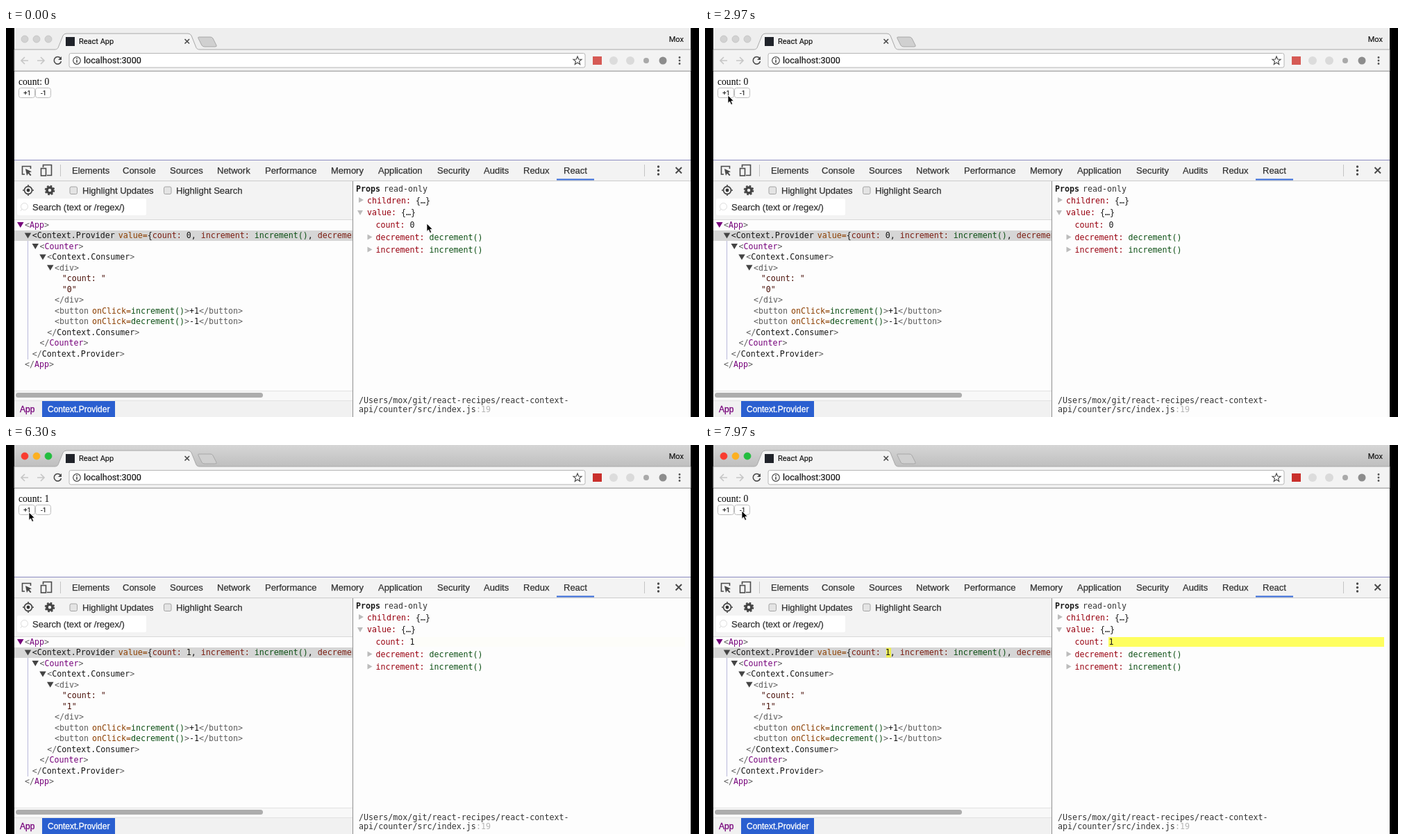
Write an HTML page that moves like this. It is 998 by 561 pixels and loops after 8 s.

```html
<!DOCTYPE html>
<html lang="en">
<head>
<meta charset="utf-8">
<title>Counter</title>
<style>
  html, body { margin: 0; width: 100%; height: 100%; overflow: hidden; background: #000; }
  svg { display: block; width: 100%; height: 100%; }
  text { white-space: pre; }
  .ui { font: 11px Roboto, sans-serif; fill: #111; stroke: #111; stroke-width: .15; }
  .tool { font: 13px "Liberation Sans", Arial, sans-serif; fill: #333; stroke: #333; stroke-width: .25; }
  .crumb { font: 12px "Liberation Sans", Arial, sans-serif; stroke-width: .3; }
  .page { font: 13.6px "Liberation Serif", Times, serif; fill: #000; }
  .code { font: 11.64px "DejaVu Sans Mono", monospace; fill: #1a1a1a; }
  .path { font-size: 11.7px; fill: #333; }
  .tag { fill: #75007a; }
  .host { fill: #5c5c5c; }
  .special { fill: #161616; }
  .attr { fill: #8c3f00; }
  .key { fill: #98000f; }
  .text { fill: #4a1008; }
  .func { fill: #0c4f14; }
  .faint { fill: #b5b5b5; }
  #tree .key { fill: #7a1c10; }
  .line { fill: none; stroke: #4a4a4a; stroke-width: 1.6; }
</style>
</head>
<body>
<svg viewBox="0 0 998 561" preserveAspectRatio="none">
  <defs>
    <linearGradient id="active" x2="0" y2="1"><stop stop-color="#d6d6d6"/><stop offset="1" stop-color="#bfbfbf"/></linearGradient>
  </defs>
  <rect width="998" height="561"/>
  <rect x="12" width="974" height="561" fill="#fdfdfd"/>

  <!-- Tab strip -->
  <rect id="strip" x="12" width="974" height="31"/>
  <g id="lights" stroke-width=".7">
    <circle cx="27" cy="16" r="5"/><circle cx="44" cy="16" r="5"/><circle cx="61" cy="16" r="5"/>
  </g>
  <path d="M12 31H70C74 31 75 29 76 26L82 11Q83.500 8 87 8H262Q265.500 8 267 11L273 26C274 29 275 31 279 31H986V62H12Z" fill="#f3f3f3" stroke="#a8a8a8"/>
  <path d="M278 13H294Q297 13 298 15L303 25Q304 27 301 27H286Q283 27 282 25L277 15Q276 13 278 13Z" fill="#d0d0d0" stroke="#a8a8a8"/>
  <rect x="86" y="13" width="13" height="13" fill="#20232a"/>
  <text class="ui" x="105" y="23">React App</text>
  <path d="M257.500 16 264 22.500M264 16 257.500 22.500" class="line" stroke-width="1.300"/>
  <text class="ui" x="976" y="20" text-anchor="end">Mox</text>

  <!-- Address bar -->
  <path d="M32 47H22M27 42 22 47 27 52M45 47H55M50 42 55 47 50 52" fill="none" stroke="#c6c6c6" stroke-width="1.600"/>
  <path d="M78.500 43.500A5.200 5.200 0 1 0 79.500 48" class="line"/>
  <path d="M80 41V46H75Z" fill="#4a4a4a"/>
  <rect x="91" y="36.500" width="743" height="20.500" rx="2.500" fill="#fff" stroke="#b5b5b5"/>
  <circle cx="102" cy="47" r="5.300" class="line" style="stroke-width:1.200"/>
  <path d="M102 46V50M102 43.500V45" class="line"/>
  <text class="ui" x="112" y="51" style="font-size:12.600px">localhost:3000</text>
  <path d="M823 41 824.600 45 829 45.300 825.600 48.100 826.700 52.400 823 50 819.300 52.400 820.400 48.100 817 45.300 821.400 45Z" class="line" style="stroke-width:1.200"/>
  <rect id="extension" x="845" y="41" width="13" height="12"/>
  <circle cx="875" cy="47" r="6" fill="#dcdcdc"/>
  <circle cx="899" cy="47" r="6" fill="#dadada"/>
  <circle cx="922" cy="47" r="4" fill="#a9a9a9"/>
  <circle cx="946" cy="47" r="5.500" fill="#8c8c8c"/>
  <g fill="#555"><circle cx="970" cy="42.500" r="1.400"/><circle cx="970" cy="47" r="1.400"/><circle cx="970" cy="51.500" r="1.400"/></g>
  <path d="M12 62.500H986" stroke="#b2b2b2"/>

  <!-- Page -->
  <text class="page" x="18" y="81.500">count: <tspan class="pageCount"></tspan></text>
  <g fill="#fff" stroke="#bdbdbd"><rect x="18.500" y="86.500" width="23" height="14" rx="3"/><rect x="42.500" y="86.500" width="22" height="14" rx="3"/></g>
  <text class="ui" x="30.500" y="97" text-anchor="middle" style="font-size:9.500px">+1</text>
  <text class="ui" x="54" y="97" text-anchor="middle" style="font-size:9.500px">-1</text>

  <!-- Inspector toolbar -->
  <rect x="12" y="191" width="974" height="29" fill="#f3f3f3"/>
  <path d="M12 190.500H986" stroke="#8c8cc0"/>
  <path d="M12 220.500H986" stroke="#ccc"/>
  <path d="M27 211H23.500V199.500H35.500V203" class="line"/>
  <path d="M28 203 37 207.300 33.500 208.500 36.500 212 35 213.300 32 209.800 30 213Z" fill="#4a4a4a"/>
  <path d="M53.500 201V197.500H65.500V212.500H59" class="line"/>
  <rect x="50.500" y="202.500" width="7" height="10.500" class="line"/>
  <path d="M78.500 197V214M919.500 197V214" stroke="#c4c4c4"/>
  <g id="tabs" class="tool"></g>
  <rect x="793" y="217.500" width="54" height="2" fill="#3367d6"/>
  <g fill="#4a4a4a"><circle cx="939.500" cy="200" r="1.700"/><circle cx="939.500" cy="205.500" r="1.700"/><circle cx="939.500" cy="211" r="1.700"/></g>
  <path d="M964.500 201 973 209.500M973 201 964.500 209.500" class="line" style="stroke-width:2"/>

  <!-- Tree panel -->
  <rect x="12" y="221" width="487" height="55" fill="#f3f3f3"/>
  <circle cx="32" cy="234" r="5.500" class="line" style="stroke-width:1.800"/>
  <circle cx="32" cy="234" r="2.400" fill="#333"/>
  <path d="M32 226V229M32 239V242M24 234H27M37 234H40" class="line"/>
  <circle cx="63" cy="234" r="4" fill="none" stroke="#444" stroke-width="3.600"/>
  <circle cx="63" cy="234" r="6.300" fill="none" stroke="#444" stroke-width="2" stroke-dasharray="2.600 2.348"/>
  <g fill="#e4e4e4" stroke="#a3a3a3"><rect x="92" y="229" width="10.500" height="10.500" rx="2"/><rect x="227.500" y="229" width="10.500" height="10.500" rx="2"/></g>
  <text class="tool" x="110" y="239">Highlight Updates</text>
  <text class="tool" x="245" y="239">Highlight Search</text>
  <rect x="16" y="246" width="186" height="24" rx="2" fill="#fff"/>
  <circle cx="26.500" cy="257.500" r="5" fill="none" stroke="#ddd"/>
  <path d="M23 261 21 264" stroke="#ddd"/>
  <text class="tool" x="38" y="262.500">Search (text or /regex/)</text>
  <path d="M12 276.500H499" stroke="#d8d8d8"/>
  <rect x="12" y="292" width="487" height="15" fill="#d6d6d6"/>
  <rect class="flash" x="261" y="292.500" width="7" height="14" fill="#ff0"/>
  <path d="M31.500 307V478" stroke="#b9b9dc"/>
  <svg width="499" height="561"><g id="tree" class="code"></g></svg>

  <rect x="12" y="523" width="487" height="15" fill="#f8f8f8"/>
  <path d="M12 523.500H499M12 537.500H499" stroke="#e2e2e2"/>
  <rect x="14" y="526" width="356" height="7" rx="3.500" fill="#adadad"/>
  <rect x="12" y="538" width="487" height="23" fill="#f1f1f1"/>
  <text class="crumb tag" x="20" y="553.500" stroke="#75007a">App</text>
  <rect x="52" y="538" width="105" height="23" fill="#2a5fd0"/>
  <text class="crumb" x="60" y="553.500" fill="#fff" stroke="#fff">Context.Provider</text>
  <path d="M499.500 221V561" stroke="#8f8f8f"/>

  <!-- Props panel -->
  <rect class="flash" x="581" y="277" width="397" height="14" fill="#ff0"/>
  <g class="code">
    <text x="504" y="236" font-weight="bold">Props</text>
    <text x="544" y="236" fill="#333">read-only</text>
    <text x="520" y="252.500"><tspan class="key">children:</tspan> {…}</text>
    <text x="520" y="270"><tspan class="key">value:</tspan> {…}</text>
    <text x="532.500" y="288"><tspan class="key">count:</tspan> <tspan class="toolCount"></tspan></text>
    <text x="532.500" y="306"><tspan class="key">decrement:</tspan> <tspan class="func">decrement()</tspan></text>
    <text x="532.500" y="324"><tspan class="key">increment:</tspan> <tspan class="func">increment()</tspan></text>
    <text class="path" x="508" y="540.500">/Users/mox/git/react-recipes/react-context-</text>
    <text class="path" x="508" y="554">api/counter/src/index.js<tspan class="faint">:19</tspan></text>
  </g>
  <path d="M508 244V252L515 248ZM506 263H514L510 270ZM520.500 297.500V305.500L527.500 301.500ZM520.500 315.500V323.500L527.500 319.500Z" fill="#bcbcbc"/>

  <path id="cursor" d="M0 0V11.500L2.600 9 4.600 13.600 6.700 12.700 4.800 8.300H8.400Z" fill="#000" stroke="#fff" stroke-width=".8"/>
</svg>

<script>
const LOOP = 8000;
const find = id => document.getElementById(id);
const all = selector => document.querySelectorAll(selector);
const span = (kind, text) => `<tspan class="${kind}">${text}</tspan>`;
const open = (name, kind) => `&lt;${span(kind, name)}>`;
const close = (name, kind) => `&lt;/${span(kind, name)}>`;

const tabs = { Elements: 95, Console: 168, Sources: 236, Network: 304, Performance: 373,
  Memory: 468, Application: 536, Security: 621, Audits: 688, Redux: 745, React: 803 };
find("tabs").innerHTML = Object.entries(tabs)
  .map(([label, x]) => `<text x="${x}" y="209.500">${label}</text>`).join("");

const button = (action, label) => `&lt;${span("host", "button")}<tspan class="attr" dx="5">onClick=</tspan>` +
  `${span("func", action + "()")}>${span("special", label)}${close("button", "host")}`;
const provider = `&lt;${span("special", "Context.Provider")}<tspan class="attr" dx="5">value=</tspan>{` +
  `${span("key", "count:")} ${span("toolCount", "")}, ${span("key", "increment:")} ` +
  `${span("func", "increment()")}, ${span("key", "decrement:")} ${span("func", "decrement()")}}`;

// Each row: depth, markup, has an arrow, base colour class
const rows = [
  [0, open("App", "tag"), true, "host"],
  [1, provider, true, "special"],
  [2, open("Counter", "tag"), true, "host"],
  [3, open("Context.Consumer", "special"), true, "host"],
  [4, open("div", "host"), true, "host"],
  [5, '"count: "', false, "text"],
  [5, `"${span("toolCount", "")}"`, false, "text"],
  [4, close("div", "host"), false, "host"],
  [4, button("increment", "+1"), false, "host"],
  [4, button("decrement", "-1"), false, "host"],
  [3, close("Context.Consumer", "special"), false, "host"],
  [2, close("Counter", "tag"), false, "host"],
  [1, close("Context.Provider", "special"), false, "host"],
  [0, close("App", "tag"), false, "host"]
];
find("tree").innerHTML = rows.map(([depth, markup, arrow, kind], i) => {
  const x = 27 + depth * 10.75, y = 288 + i * 15.46;
  const triangle = arrow
    ? `<path d="M${x - 11} ${y - 8}h9.500l-4.750 8z" fill="${depth ? "#444" : "#75007a"}"/>` : "";
  return `${triangle}<text class="${kind}" x="${x}" y="${y}">${markup}</text>`;
}).join("");

const FOCUS = 3900;
const pageCounts = [[0, 0], [5380, 1], [6730, 2], [7640, 1], [7900, 0]];
const toolCounts = [[0, 0], [5460, 1], [6800, 2], [7735, 1]];
const cursorPath = [[0, 606, 282], [200, 606, 282], [1100, 33, 97],
  [6930, 33, 97], [7100, 45, 95], [7280, 53, 95], [LOOP, 53, 95]];

const latest = (steps, t) => steps.filter(([start]) => start <= t).pop();
const smooth = p => p * p * (3 - 2 * p);

// The CSS "ease" curve, solved for x by bisection
function ease(x) {
  const bezier = (s, a, b) => 3 * s * (1 - s) ** 2 * a + 3 * s * s * (1 - s) * b + s ** 3;
  let low = 0, high = 1;
  for (let i = 0; i < 18; i++) {
    const mid = (low + high) / 2;
    if (bezier(mid, .25, .25) < x) low = mid; else high = mid;
  }
  return bezier(low, .1, 1);
}

function cursorAt(t) {
  const i = cursorPath.findIndex(([time]) => time > t);
  const [t0, x0, y0] = cursorPath[i - 1], [t1, x1, y1] = cursorPath[i];
  const p = smooth((t - t0) / (t1 - t0));
  return [x0 + (x1 - x0) * p, y0 + (y1 - y0) * p];
}

function draw(now) {
  const t = now % LOOP;
  const focused = t >= FOCUS;
  const colors = focused ? ["#f93b30", "#fdb020", "#22bd3e"] : ["#d2d2d2", "#d2d2d2", "#d2d2d2"];
  [...find("lights").children].forEach((light, i) => {
    light.setAttribute("fill", colors[i]);
    light.setAttribute("stroke", focused ? colors[i] : "#bdbdbd");
  });
  find("strip").setAttribute("fill", focused ? "url(#active)" : "#eee");
  find("extension").setAttribute("fill", focused ? "#c9302c" : "#d65a55");

  const [changed, value] = latest(toolCounts, t);
  all(".pageCount").forEach(node => node.textContent = latest(pageCounts, t)[1]);
  all(".toolCount").forEach(node => node.textContent = value);
  const glow = changed ? 1 - ease(Math.min(1, (t - changed) / 1000)) : 0;
  all(".flash").forEach(node => node.setAttribute("opacity", glow));

  find("cursor").setAttribute("transform", `translate(${cursorAt(t)})`);
  requestAnimationFrame(() => draw(performance.now() - began));
}

const began = performance.now();
draw(0);
</script>
</body>
</html>
```
